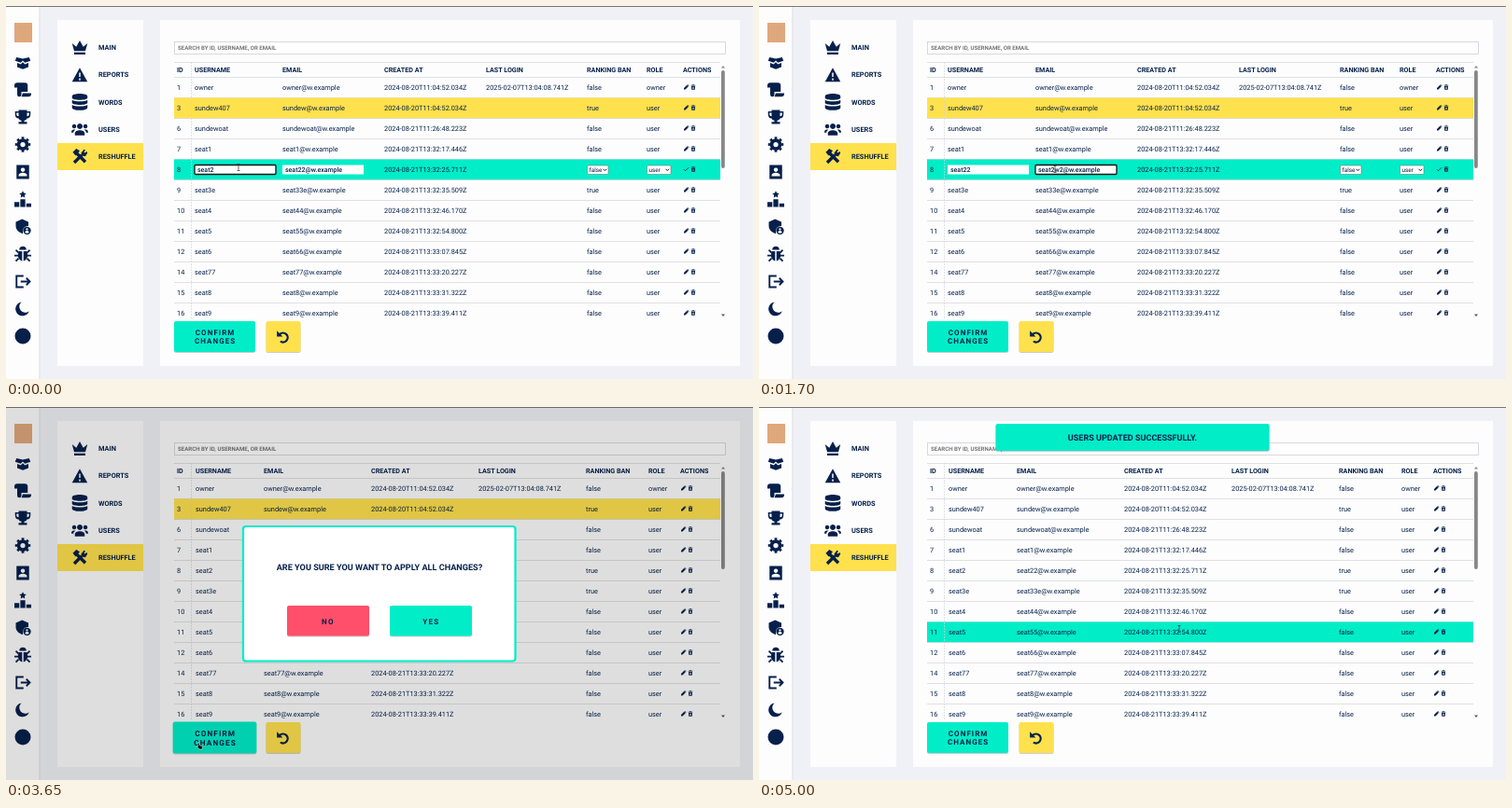
Write an HTML page that moves like this. It is 800 px wide and 400 px high and loops after 5.05 s.

```html
<!DOCTYPE html>
<html lang="en">
<head>
<meta charset="utf-8">
<title>Reshuffle users</title>
<style>
  html, body { margin: 0; width: 100%; height: 100%; overflow: hidden; background: #f0f1f6; }
  svg { display: block; width: 800px; height: 400px; font-family: Roboto, sans-serif; text-rendering: geometricPrecision; }
  text { white-space: pre; }
</style>
</head>
<body>
<svg id="stage" viewBox="0 0 800 400"></svg>
<script>
const LOOP = 5050, STEP = 50;
const NAVY = '#06204b', TEAL = '#00edc8', YELLOW = '#ffe14d', RED = '#ff4f6a';

// Moments at which the state changes
const AT = { typeName: 400, focusMail: 1050, typeMail: 1450, press: 2450, save: 2600, undo: 3250,
             ask: 3600, toast: 4500 };

// Pointer stops: time, x, y
const PATH = [[0, 249, 173], [600, 249, 173], [900, 317, 175], [1750, 317, 175], [2300, 730, 175],
  [2700, 730, 175], [3100, 294, 360], [3300, 294, 360], [3500, 206, 361], [3750, 206, 361],
  [4150, 368, 294], [4350, 450, 238], [5050, 450, 238]];

const EDITING = [183, 202, 296, 405, 514, 622, 686, 725];
const READING = [183, 203, 276, 391, 506, 621, 688, 722];
const HEADS = ['ID', 'USERNAME', 'EMAIL', 'CREATED AT', 'LAST LOGIN', 'RANKING BAN', 'ROLE', 'ACTIONS'];
const ROWS = [
  [1, 'owner', 'owner', '20T11:04:52.034Z'],
  [3, 'sundew407', 'sundew', '20T11:04:52.034Z'],
  [6, 'sundewoat', 'sundewoat', '21T11:26:48.223Z'],
  [7, 'seat1', 'seat1', '21T13:32:17.446Z'],
  [8, 'seat2', 'seat22', '21T13:32:25.711Z'],
  [9, 'seat3e', 'seat33e', '21T13:32:35.509Z'],
  [10, 'seat4', 'seat44', '21T13:32:46.170Z'],
  [11, 'seat5', 'seat55', '21T13:32:54.800Z'],
  [12, 'seat6', 'seat66', '21T13:33:07.845Z'],
  [14, 'seat77', 'seat77', '21T13:33:20.227Z'],
  [15, 'seat8', 'seat8', '21T13:33:31.322Z'],
  [16, 'seat9', 'seat9', '21T13:33:39.411Z']
];
const TOP = 76.5, PITCH = 22, EDITED = 4;
const mail = name => name + '@w.example';

// Icons on a 24-unit grid
const fill = d => `<path d="${d}" fill-rule="evenodd"/>`;
const line = (d, w) => `<path d="${d}" fill="none" stroke="${NAVY}" stroke-width="${w}"/>`;
const ICONS = {
  box: fill('M3 5l9 2 9-2 2 5-8 2.5-3-3-3 3L1 10zM4 13l5 2 3-3 3 3 5-2v6l-8 3-8-3z'),
  scroll: fill('M4 2h11a4 4 0 0 1 4 4v9h-9v4a3 3 0 0 1-6 0V9H0V6a4 4 0 0 1 4-4zM12 17h12v1a4 4 0 0 1-4 4H10z'),
  trophy: fill('M6 2h12v2h5v4c0 4-2 6-5 6-1 2-2 3-4 3v2h4v3H6v-3h4v-2c-2 0-3-1-4-3-3 0-5-2-5-6V4h5zM3 6v2c0 2 1 3 3 3V6zM18 6v5c2 0 3-1 3-3V6z'),
  gear: `<g fill="none" stroke="${NAVY}"><circle cx="12" cy="12" r="6" stroke-width="5"/>
    <circle cx="12" cy="12" r="9" stroke-width="4" pathLength="16" stroke-dasharray="1" stroke-dashoffset=".5"/></g>`,
  contact: fill('M3 2h18v20H3zM12 6a3 3 0 1 0 .1 0zM6 18h12v-1c0-5-12-5-12 0z'),
  podium: fill('M0 16h7v7H0zM8.5 12h7v11h-7zM17 18h7v5h-7zM12 0l1.5 3 3.5.5-2.5 2.5.5 3.5-3-1.5-3 1.5.5-3.5L7 3.5l3.500-.5z'),
  shield: fill('M11 1l9 4v6c-5 0-8 3-8 7v4C6 20 2 16 2 11V5zM18 12a5.5 5.5 0 1 0 .1 0zM18 14a1.5 1.5 0 1 1-.1 0zM15 20c1-3 5-3 6 0-2 2-4 2-6 0z'),
  bug: fill('M7 6a5 5 0 0 1 10 0zM6 8h5v14c-3-1-6-4-6-8zM13 8h5l1 6c0 4-3 7-6 8z') +
    line('M2 6l4 4M22 6l-4 4M0 14h6M24 14h-6M2 22l4-4M22 22l-4-4', 2.4),
  exit: line('M13 4H3v16h10M9 12h13M17 7l5 5-5 5', 2.5),
  moon: fill('M21 15A10 10 0 1 1 10 2a8 8 0 0 0 11 13z'),
  crown: fill('M4 17L1 6l6 5 5-9 5 9 6-5-3 11zM4 19h16v3H4z'),
  warn: fill('M12 2l11 20H1zM11 9v6h2V9zM11 17v3h2v-3z'),
  data: fill('M1 4c0-5 22-5 22 0v2c0 4-22 4-22 0zM1 9c4 3 18 3 22 0v4c0 4-22 4-22 0zM1 16c4 3 18 3 22 0v4c0 5-22 5-22 0z'),
  users: fill('M12 4a4 4 0 1 0 .1 0zM4 5a3 3 0 1 0 .1 0zM20 5a3 3 0 1 0 .1 0zM5 21v-3c0-6 14-6 14 0v3zM0 17c0-5 3-5 6-4-2 1-3 2-3 4zM24 17c0-5-3-5-6-4 2 1 3 2 3 4z'),
  tools: line('M7 7l13 13M4 21L15 10', 4.5) +
    fill('M2 6l5-5 5 3-6 7zM14 7l4-5 2 1-2 3 1 1 3-2 1 2-3 5-5-1z'),
  pencil: fill('M2 22v-6L15 3l6 6L8 22zM16 2l2-2 6 6-2 2z'),
  trash: fill('M3 3h5l1-2h6l1 2h5v3H3zM4 8h16l-1 15H5zM8 11v9h2v-9zM14 11v9h2v-9z'),
  check: line('M2 13l6 6L22 5', 3.5),
  undo: line('M6 7A8 8 0 1 1 7 19.5', 3.6) + fill('M1 1v10h10z')
};

const rect = (x, y, w, h, color, extra = '') =>
  `<rect x="${x}" y="${y}" width="${w}" height="${h}" fill="${color}" ${extra}/>`;
const text = (x, y, str, size = 7.35, weight = 400, extra = '') =>
  `<text x="${x}" y="${y + size * .36}" font-size="${size}" font-weight="${weight}" fill="${NAVY}" ${extra}>${str}</text>`;
const icon = (name, x, y, size) =>
  `<g fill="${NAVY}" transform="translate(${x - size / 2} ${y - size / 2}) scale(${size / 24})">${ICONS[name]}</g>`;
const raised = (x, y, w, h, color) =>
  rect(x, y + 1, w, h, 'rgba(0,0,0,.2)', 'rx="2"') + rect(x, y, w, h, color, 'rx="2"');
const middle = 'text-anchor="middle"';

const inside = ([x, y], left, top, right, bottom) => x > left && x < right && y > top && y < bottom;
const asking = t => t >= AT.ask && t < AT.toast;

function pointerAt(t) {
  const i = PATH.findIndex((stop, n) => n && t < stop[0]);
  const [t0, x0, y0] = PATH[i - 1], [t1, x1, y1] = PATH[i];
  const p = (t - t0) / (t1 - t0), k = p * p * (3 - 2 * p);
  return [x0 + (x1 - x0) * k, y0 + (y1 - y0) * k];
}

function frameParts() {
  const side = ['box', 'scroll', 'trophy', 'gear', 'contact', 'podium', 'shield', 'bug', 'exit', 'moon'];
  const menu = [['crown', 'MAIN'], ['warn', 'REPORTS'], ['data', 'WORDS'], ['users', 'USERS'], ['tools', 'RESHUFFLE']];
  return rect(0, 0, 800, 400, '#f0f1f6') + rect(0, 0, 35.5, 400, '#fdfdfd') + rect(35.5, 0, 1, 400, '#dfe1e8') +
    rect(55, 15, 92, 371, '#fdfdfd') + rect(165, 15, 621, 371, '#fdfdfd') + rect(0, 0, 800, 1, '#777') +
    rect(9, 18, 19, 21, '#dfa77c') +
    side.map((name, i) => icon(name, 18, 60.3 + i * 29.4, 18)).join('') +
    `<circle cx="18" cy="354" r="8.5" fill="${NAVY}"/>` +
    rect(55, 147, 92, 29, YELLOW) +
    menu.map(([name, label], i) => icon(name, 79, 44.5 + i * 29.2, 18) + text(99, 44.5 + i * 29.2, label, 7.4, 700)).join('') +
    rect(180.5, 38.5, 590, 13, '#fff', 'stroke="#cfd0d5" stroke-width=".8"') +
    text(184, 45, 'SEARCH BY ID, USERNAME, OR EMAIL', 6.1, 700, 'style="fill:#757575"') +
    rect(766, 69, 3.8, 105, '#878787', 'rx="1.9"') +
    '<path d="M766 66.5l2-2.500 2 2.500z" fill="#888"/><path d="M766 330.5h4l-2 2.500z" fill="#555"/>';
}
const FRAME = frameParts();

function field(x, value, focused) {
  const border = focused ? 'stroke="#111" stroke-width="1.3" rx="1"' : '';
  return rect(x, 170.5, 87, 10, '#fff', border) + text(x + 3, 175.5, value, 7, 500);
}

function select(x, w, value) {
  return rect(x, 171, w, 9.5, '#fff', 'stroke="#777" stroke-width=".6" rx="1"') +
    text(x + 2, 175.7, value, 6.4) +
    `<path d="M${x + w - 5.5} 174.8l1.8 1.8 1.8-1.8" fill="none" stroke="#111"/>`;
}

function editors(t, cols) {
  const onName = t < AT.focusMail, onMail = !onName && t < AT.press;
  const name = t >= AT.typeName ? 'seat22' : 'seat2';
  const caret = onName && t % 1000 >= 500 ? '<tspan font-weight="300">|</tspan>' : '';
  return field(cols[1], name + caret, onName) +
    field(cols[2], mail(t >= AT.typeMail ? 'seat2w2' : 'seat22'), onMail) +
    select(622.5, 22.5, 'false') + select(686.5, 25.5, 'user');
}

function table(t, pointer) {
  const editing = t < AT.save, cols = editing ? EDITING : READING;
  const hover = asking(t) || pointer[1] > 334 ? -1 : Math.floor((pointer[1] - TOP) / PITCH);
  const rule = 'stroke="#d3d5da" stroke-width=".7"';
  let out = HEADS.map((h, i) => text(cols[i], 68.3, h, 7.2, 700)).join('') +
    `<path d="M180 60.5H765M180 ${TOP}H765" ${rule}/>`;

  ROWS.forEach(([id, name, box, stamp], i) => {
    const top = TOP + i * PITCH, y = top + 11;
    const own = i === EDITED, inEdit = own && editing;
    const pending = own && t >= AT.save && t < AT.undo;
    const color = inEdit || i === hover ? TEAL
      : pending || (i === 1 && t < AT.toast) ? YELLOW : '';
    if (color) out += rect(180, top, 585, PITCH, color);
    out += `<path d="M180 ${top + PITCH}H765" ${rule}/>`;
    out += text(cols[0], y, id) + text(cols[3], y, '2024-08-' + stamp);
    if (!i) out += text(cols[4], y, '2025-02-07T13:04:08.741Z');
    if (inEdit) out += editors(t, cols);
    else {
      const banned = i === 1 || i === 5 || (own && !pending);
      out += text(cols[1], y, pending ? 'seat22' : name) + text(cols[2], y, mail(pending ? 'seat2w2' : box)) +
        text(cols[5], y, banned) + text(cols[6], y, i ? 'user' : 'owner');
    }
    out += icon(inEdit ? 'check' : 'pencil', cols[7] + 3.5, y - .5, 6) + icon('trash', cols[7] + 11, y - .5, 6);
  });
  if (editing && t >= AT.press)
    out += rect(725, 171.5, 7.5, 7.5, 'none', `rx="2.5" stroke="${NAVY}" stroke-width=".8"`);
  return `<g clip-path="url(#view)">${out}<path d="M198.5 60V335" ${rule} stroke-dasharray="2 1"/></g>`;
}

function buttons(pointer) {
  const grow = (x, hot, body) =>
    `<g transform="translate(${x} 354.5) scale(${hot ? 1.03 : 1})">${body}</g>`;
  const label = 'letter-spacing="1.05"';
  return grow(223.5, inside(pointer, 180, 338, 267, 371), raised(-43.5, -16.5, 87, 33, TEAL) +
      text(-20.7, -4.3, 'CONFIRM', 8, 700, label) + text(-21.5, 5, 'CHANGES', 8, 700, label)) +
    grow(297, inside(pointer, 278, 338, 315, 371), raised(-18.5, -16.5, 37, 33, YELLOW) + icon('undo', 0, .5, 15));
}

function dialog() {
  const spaced = middle + ' letter-spacing="1.3"';
  return rect(0, 0, 800, 400, 'rgba(0,0,0,.12)') +
    rect(254, 128, 291.5, 144.5, '#fff', `rx="3" stroke="${TEAL}" stroke-width="2.2"`) +
    text(400, 171.5, 'ARE YOU SURE YOU WANT TO APPLY ALL CHANGES?', 9.15, 700, middle) +
    raised(301, 213, 88, 32.5, RED) + raised(411, 213, 88, 32.5, TEAL) +
    text(345, 229.7, 'NO', 8, 700, spaced) + text(455.3, 229.7, 'YES', 8, 700, spaced);
}

function toast(t) {
  const p = Math.min(1, (t - AT.toast) / 250), y = -32 + 50 * (1 - (1 - p) ** 3);
  return raised(253.5, y, 293, 29, TEAL) + text(400, y + 15, 'USERS UPDATED SUCCESSFULLY.', 9.05, 700, middle);
}

function cursor(t, pointer) {
  const hand = inside(pointer, 180, 338, 315, 371) || (t < AT.save && pointer[0] > 722) ||
    (asking(t) && inside(pointer, 411, 213, 499, 246));
  const beam = (t < AT.save && inside(pointer, 202, 169, 383, 182)) || t >= AT.toast;
  const shape = beam
    ? '<path d="M-1.5-3.5h3M0-3.5v7M-1.5 3.5h3" fill="none" stroke="#444" stroke-width=".8"/>'
    : `<path d="${hand ? 'M0-1l1-.3.7 3.3 3 .8-.5 3.2H1l-2.500-3 1.300-.3z' : 'M0-2v7.5l1.8-1.5 1.2 2.5 1.2-.6-1.2-2.4h2.3z'}"
       fill="#000" stroke="#fff" stroke-width=".5"/>`;
  return `<g transform="translate(${pointer.join(' ')})">${shape}</g>`;
}

const stage = document.getElementById('stage');
const CLIP = '<clipPath id="view"><rect x="179" y="59" width="587" height="276"/></clipPath>';
let shown = -1;

function draw(t) {
  const pointer = pointerAt(t);
  stage.innerHTML = CLIP + FRAME + table(t, pointer) + buttons(pointer) +
    (asking(t) ? dialog() : '') + (t >= AT.toast ? toast(t) : '') + cursor(t, pointer);
}

function tick() {
  const t = Math.floor(performance.now() % LOOP / STEP) * STEP;
  if (t !== shown) draw(shown = t);
  requestAnimationFrame(tick);
}
tick();
</script>
</body>
</html>
```
